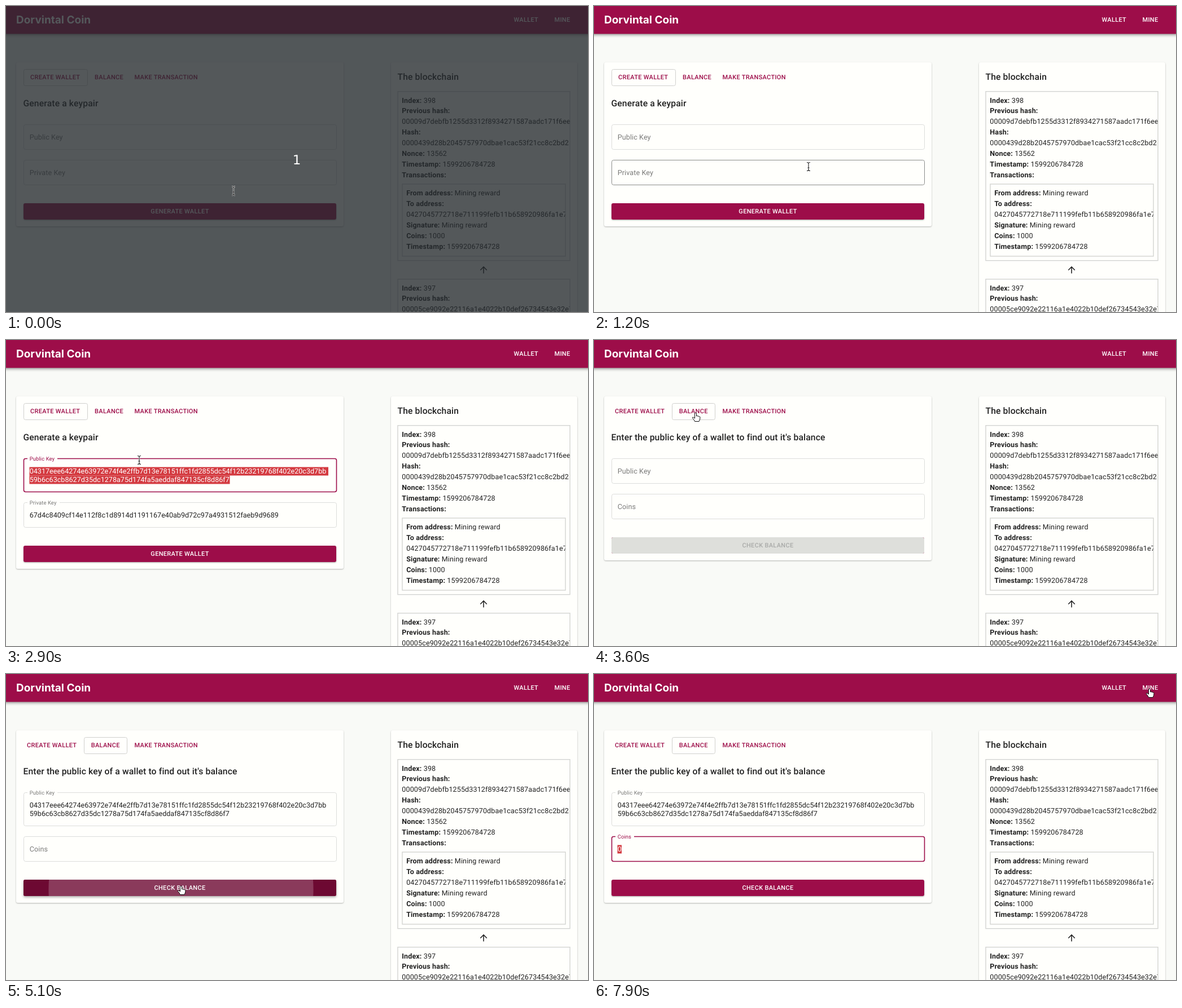
An HTML page for the animation above (8000 ms loop, 1031 by 543 pixels).

```html
<!DOCTYPE html>
<html lang="en">
<head>
<meta charset="utf-8">
<title>Wallet demo</title>
<style>
  html, body { margin: 0; width: 100%; height: 100%; overflow: hidden; background: #f9faf7; }
  svg { display: block; }
  text { font-family: Roboto, sans-serif; text-rendering: geometricPrecision; white-space: pre; }
  .panel { fill: #fffffc; filter: drop-shadow(0 1px 1px rgba(0,0,0,.28)); }
  .bar { fill: #9d0d49; filter: drop-shadow(0 2px 2.5px rgba(0,0,0,.4)); }
  .box { fill: none; stroke: #d3d4d2; stroke-width: 1.4; }
</style>
</head>
<body>
<svg id="stage" width="1031" height="543" viewBox="0 0 1031 543">
  <clipPath id="outer"><rect x="694" y="150" width="304.5" height="400"/></clipPath>
  <clipPath id="inner"><rect x="702" y="316" width="288.5" height="128"/></clipPath>
  <clipPath id="clipButton"><rect id="clipRect" x="31" width="554" height="29" rx="3"/></clipPath>
  <g id="fixed"></g>
  <g id="wallet"></g>
  <g id="dim">
    <rect width="1031" height="543" fill="#24292e" opacity=".78"/>
    <text x="515" y="280.5" font-size="23" fill="#fff" text-anchor="middle" style="font-family:'DejaVu Sans',sans-serif">1</text>
  </g>
  <g id="cursor"></g>
</svg>
<script>
const DURATION = 8000, STEP = 100;
const MAIN = '#9d0d49', DARK = '#6d0932', INK = '#222', PANEL = '#fffffc', SELECT = '#d43b41';
const PUBLIC_KEY = [
  '04317eee64274e63972e74f4e2ffb7d13e78151ffc1fd2855dc54f12b23219768f402e20c3d7bb',
  '59b6c63cb8627d35dc1278a75d174fa5aeddaf847135cf8d86f7'
];
const PRIVATE_KEY = ['67d4c8409cf14e112f8c1d8914d1191167e40ab9d72c97a4931512faeb9d9689'];

// time, x, y of the hot spot, shape from then on
const PATH = [
  [0, 403, 328, 'beam'], [200, 402, 298, 'beam'], [300, 405, 245, 'beam'], [400, 406, 215, 'beam'],
  [800, 406, 215, 'beam'], [900, 406.5, 214, 'beam'], [1000, 406.5, 214, 'beam'], [1200, 380, 285, 'beam'],
  [1300, 350, 340, 'arrow'], [1400, 328, 360, 'hand'], [1500, 323, 366, 'hand'], [1700, 323, 366, 'hand'],
  [1800, 300, 345, 'arrow'], [1900, 261, 300, 'arrow'], [2100, 238, 218, 'arrow'], [2300, 237, 216, 'beam'],
  [2500, 236, 213, 'beam'], [3000, 236, 213, 'beam'], [3200, 210, 175, 'arrow'], [3400, 180, 129, 'hand'],
  [3700, 180, 129, 'hand'], [3900, 205, 232, 'beam'], [4100, 208, 240, 'beam'], [4300, 219, 306, 'beam'],
  [4500, 255, 345, 'arrow'], [4700, 300, 374, 'hand'], [4800, 310, 376, 'hand'], [5400, 310, 376, 'hand'],
  [5700, 400, 346, 'arrow'], [5800, 400, 346, 'arrow'], [6100, 494, 230, 'arrow'], [6300, 380, 262, 'arrow'],
  [6400, 280, 292, 'beam'], [6700, 62, 310, 'beam'], [7000, 62, 310, 'beam'], [7200, 230, 270, 'arrow'],
  [7600, 945, 62, 'arrow'], [7700, 967, 46, 'arrow'], [7800, 980, 31, 'hand'], [7900, 984, 26, 'hand']
];

const SHAPES = {
  beam: `<path d="M-3-7.5Q0-7.5 0-5.5Q0-7.5 3-7.5M0-6V6M-3 7.5Q0 7.5 0 5.5Q0 7.5 3 7.5M-1.5 2H1.5" fill="none" stroke="#fff" stroke-width="2.6" opacity=".8"/>
    <path d="M-3-7.5Q0-7.5 0-5.5Q0-7.5 3-7.5M0-6V6M-3 7.5Q0 7.5 0 5.5Q0 7.5 3 7.5M-1.5 2H1.5" fill="none" stroke="#222" stroke-width="1.1"/>`,
  arrow: '<path d="M0 0V13L3 10.3L5 15L7.3 14L5.3 9.5H9.3Z" fill="#111" stroke="#fff" stroke-width=".9"/>',
  hand: '<path d="M-1.5 1Q0-1 1.5 1V6Q3 4.6 4 6.3Q5.4 5.2 6.2 7Q8 6.4 8 8.4Q8 12 6 15.5H-1.5Q-2.5 12.5-5.5 9.5Q-6 7.6-3.8 8.2L-1.5 10Z" fill="#fff" stroke="#111" stroke-width="1"/>'
};

const $ = id => document.getElementById(id);
const clamp = v => Math.max(0, Math.min(1, v));
const ramp = (t, from, length) => clamp((t - from) / length);
const mix = (a, b, k) => a + (b - a) * k;
const easeOut = k => 1 - (1 - k) ** 2.6;
const easeInOut = k => k < .3 ? 4.6 * k * k : 1 - 1.195 * (1 - k) ** 2;

const text = (x, y, s, size, { weight = 400, fill = INK, space = 0, anchor = 'start', extra = '' } = {}) =>
  `<text x="${x}" y="${y}" font-size="${size}" font-weight="${weight}" fill="${fill}" letter-spacing="${space}" text-anchor="${anchor}" ${extra}>${s}</text>`;
const caps = (x, y, s, fill, anchor) => text(x, y, s, 11, { weight: 500, fill, space: .314, anchor });
const title = (x, y, s) => text(x, y, s, 15.71, { weight: 500, space: .118 });
const body = (x, y, s, extra) => text(x, y, s, 12.57, { space: .118, extra });
const entry = (x, y, name, value = '') => body(x, y, `<tspan font-weight="700">${name}:</tspan> ${value}`);
const rect = (x, y, w, h, attrs) => `<rect x="${x}" y="${y}" width="${w}" height="${h}" ${attrs}/>`;

function drawFixed() {
  const row = i => 171.5 + i * 18.86;
  const clipOuter = 'clip-path="url(#outer)"', clipInner = 'clip-path="url(#inner)"';
  $('fixed').innerHTML = [
    rect(0, 0, 1031, 543, 'fill="#f9faf7"'),
    rect(-5, -5, 1041, 54.5, 'class="bar"'),
    text(18, 30.5, 'Dorvintal Coin', 19, { weight: 700, fill: '#fff', extra: 'style="font-family:Inter,sans-serif"' }),
    caps(899.5, 28, 'WALLET', '#fff'), caps(971.5, 28, 'MINE', '#fff'),
    rect(682, 100, 330, 500, 'rx="3" class="panel"'),
    title(693.5, 130.5, 'The blockchain'),
    rect(694, 151.7, 305, 300, 'class="box"'),
    entry(701.3, row(0), 'Index', '398'),
    entry(701.3, row(1), 'Previous hash'),
    body(701.3, row(2), '00009d7debfb1255d3312f8934271587aadc171f6ee4', clipOuter),
    entry(701.3, row(3), 'Hash'),
    body(701.3, row(4), '0000439d28b2045757970dbae1cac53f21cc8c2bd2', clipOuter),
    entry(701.3, row(5), 'Nonce', '13562'),
    entry(701.3, row(6), 'Timestamp', '1599206784728'),
    entry(701.3, row(7), 'Transactions'),
    rect(702, 316, 289, 128, 'class="box"'),
    entry(709.2, 336.4, 'From address', 'Mining reward'),
    entry(709.2, 355.3, 'To address'),
    body(709.2, 374.1, '0427045772718e711199fefb11b658920986fa1e7', clipInner),
    entry(709.2, 393, 'Signature', 'Mining reward'),
    entry(709.2, 411.9, 'Coins', '1000'),
    entry(709.2, 430.7, 'Timestamp', '1599206784728'),
    `<path transform="translate(836.6 458.7) scale(.7857)" d="M4 12l1.41 1.41L11 7.83V20h2V7.83l5.58 5.59L20 12l-8-8-8 8z" fill="${INK}"/>`,
    rect(694, 484.7, 305, 300, 'class="box"'),
    entry(701.3, 504.5, 'Index', '397'),
    entry(701.3, 523.4, 'Previous hash'),
    body(701.3, 542.2, '00005ce9092e22116a1e4022b10def26734543e32e7', clipOuter)
  ].join('');
}

function cursorAt(t) {
  let i = PATH.findLastIndex(p => p[0] <= t);
  const a = PATH[i], b = PATH[i + 1] || a;
  const k = b === a ? 0 : (t - a[0]) / (b[0] - a[0]);
  return { x: mix(a[1], b[1], k), y: mix(a[2], b[2], k), shape: a[3] };
}

function tabs(balance) {
  return rect(balance ? 138.5 : 31.5, 112.5, balance ? 76 : 113, 29, 'rx="3" fill="none" stroke="#d0d0ce"') +
    caps(balance ? 37 : 43, 130.4, 'CREATE WALLET', MAIN) +
    caps(balance ? 150.7 : 157, 130.4, 'BALANCE', MAIN) +
    caps(227.5, 130.4, 'MAKE TRANSACTION', MAIN);
}

function field({ y, h, label, notch, lift = 0, focus, selected, lines = [] }, cursor) {
  const hover = cursor.shape === 'beam' && cursor.y >= y && cursor.y <= y + h;
  const stroke = focus ? MAIN : hover ? '#8b8d8b' : '#dcdddb';
  const k = easeOut(lift);
  let out = rect(31.5, y - .5, 554, h, `rx="3.2" fill="none" stroke="${stroke}" stroke-width="${focus ? 1.6 : 1}"`);
  if (lift > .62) out += rect(38, y - 2, notch, 3, `fill="${PANEL}"`);
  if (selected) lines.forEach((s, i) => {
    const width = s.length < 2 ? 7.5 : i ? 355 : 529.5;
    out += rect(41.5, y + 14.5 + i * 15, width, 15, `fill="${SELECT}"`);
  });
  out += text(41.7, mix(y + 26, y + 2.8, k), label, mix(12.57, 9.43, k), { space: .1, fill: focus ? MAIN : '#7a7a79' });
  lines.forEach((s, i) => out += text(41.7, y + 26 + i * 15, s, 12.6, { fill: selected ? '#fff' : INK }));
  return out;
}

function button({ y, label, hover, disabled = 0, fill = '#fff', ripple }) {
  const shadow = `style="filter:drop-shadow(0 ${1 + hover * 1.5}px ${1.2 + hover}px rgba(0,0,0,${.34 * (1 - disabled)}))"`;
  $('clipRect').setAttribute('y', y);
  return rect(31, y, 554, 29, `rx="3" fill="${MAIN}" ${shadow}`) +
    rect(31, y, 554, 29, `rx="3" fill="${DARK}" opacity="${hover}"`) +
    rect(31, y, 554, 29, `rx="3" fill="#dedfdb" opacity="${disabled}"`) +
    `<circle cx="${ripple.x}" cy="${y + 17}" r="${ripple.r}" fill="#fff" opacity="${ripple.alpha}" clip-path="url(#clipButton)"/>` +
    caps(308, y + 17.6, label, fill, 'middle');
}

function createView(t, cursor) {
  const filled = t >= 1790, grow = filled ? 15 : 0;
  const lift = ramp(t, 1790, 200);
  const chosen = t >= 2900;
  return title(30.5, 178.3, 'Generate a keypair') +
    field({ y: 211, h: 44 + grow, label: 'Public Key', notch: 53, lift, focus: chosen, selected: chosen, lines: filled ? PUBLIC_KEY : [] }, cursor) +
    field({ y: 274 + grow, h: 44, label: 'Private Key', notch: 57, lift, lines: filled ? PRIVATE_KEY : [] }, cursor) +
    button({
      y: 350 + grow, label: 'GENERATE WALLET',
      hover: ramp(t, 1300, 200) * (1 - ramp(t, 2250, 250)),
      ripple: { x: 323, r: 294 * easeInOut(ramp(t, 1690, 550)), alpha: .2 * (1 - ramp(t, 1900, 200)) }
    });
}

function balanceView(t, cursor) {
  const pasted = t >= 4300, grow = pasted ? 15 : 0;
  const answered = t >= 5450, focusKey = t >= 4000 && t < 4800, focusCoins = t >= 6900;
  let out = title(30.5, 178.3, "Enter the public key of a wallet to find out it's balance") +
    field({ y: 211, h: 44 + grow, label: 'Public Key', notch: 53, lift: ramp(t, 3950, 200), focus: focusKey, lines: pasted ? PUBLIC_KEY : [] }, cursor) +
    field({ y: 274 + grow, h: 44, label: 'Coins', notch: 33, lift: ramp(t, 5450, 200), focus: focusCoins, selected: focusCoins, lines: answered ? ['0'] : [] }, cursor) +
    button({
      y: 350 + grow, label: 'CHECK BALANCE',
      hover: ramp(t, 4600, 250) * (1 - ramp(t, 5450, 250)),
      disabled: 1 - ramp(t, 4300, 250), fill: pasted ? '#fff' : '#a9aaa8',
      ripple: { x: 310, r: 290 * easeInOut(ramp(t, 4800, 500)), alpha: .2 * (1 - ramp(t, 5400, 300)) }
    });
  if (focusKey) out += rect(pasted ? 396.5 : 42, pasted ? 241 : 226, .8, 14, `fill="${INK}"`);
  return out;
}

function render(t) {
  const cursor = cursorAt(t), balance = t >= 3600;
  const grown = balance ? t >= 4300 : t >= 1790;
  $('wallet').innerHTML = rect(18, 100, 580, grown ? 306 : 291, 'rx="3" class="panel"') +
    tabs(balance) + (balance ? balanceView : createView)(t, cursor);
  $('dim').style.display = t < 200 ? '' : 'none';
  $('cursor').innerHTML = `<g transform="translate(${cursor.x} ${cursor.y})">${SHAPES[cursor.shape]}</g>`;
}

const start = performance.now();
let shown = -1;
function tick() {
  const t = Math.floor((performance.now() - start) % DURATION / STEP) * STEP;
  if (t !== shown) render(shown = t);
  requestAnimationFrame(tick);
}
drawFixed();
tick();
</script>
</body>
</html>
```
